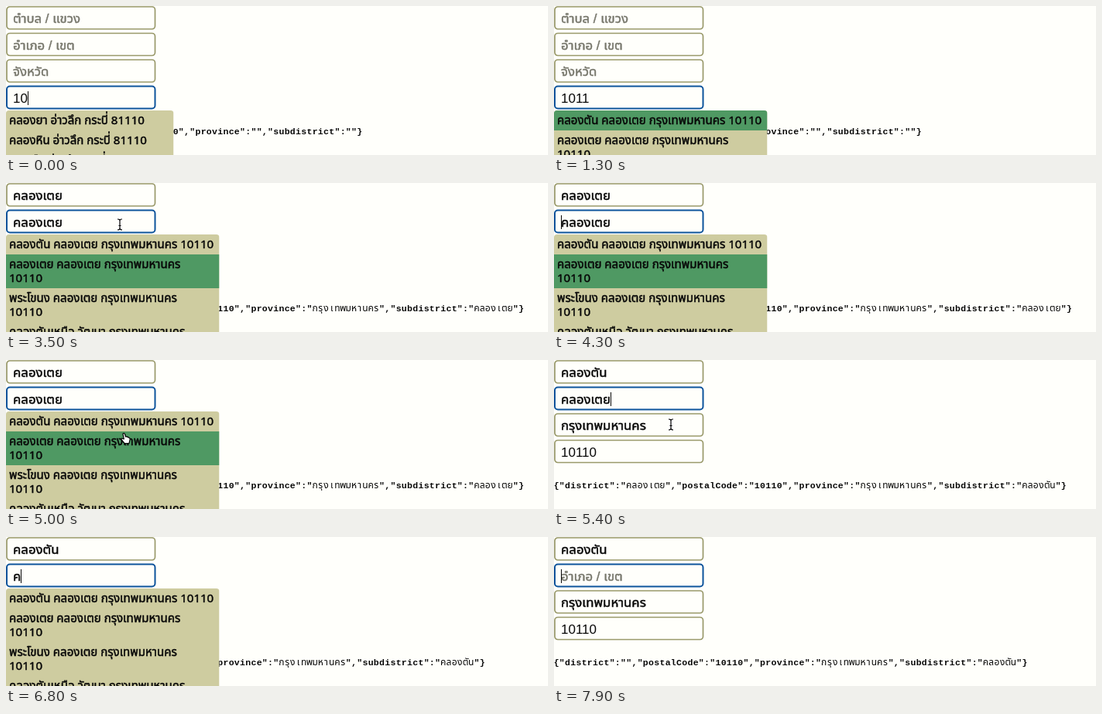
Animation, 700 px wide and 194 px high, one loop 8000 ms. Source, as an HTML page with a canvas:

```html
<!DOCTYPE html>
<html lang="th">
<head>
<meta charset="utf-8">
<title>Address autocomplete</title>
<style>
html, body { margin: 0; width: 100%; height: 100%; overflow: hidden; background: #fffffb; }
canvas { display: block; }
</style>
</head>
<body>
<canvas id="stage" width="700" height="194"></canvas>
<script>
const ctx = document.getElementById('stage').getContext('2d');
const LOOP = 8000;
const INK = '#080808', HINT = '#77776c', PAPER = '#fffffb';
const LIST = '#cecca0', ACTIVE = '#4f9963', EDGE = '#99996a', FOCUS = '#0d549c';
const THAI = '"Noto Sans Thai Looped", "Noto Sans Thai", "Noto Sans", sans-serif';
const SANS = '"Liberation Sans", ' + THAI;
const MENU = '"Noto Sans", ' + THAI;
const MONO = '"Liberation Mono", "Noto Sans Thai Looped", "Noto Sans Thai", monospace';
const CELL = 7.2;

// Thai fallback faces differ in width, so derive one type size per style
function fitSize(family, sample, width, guess) {
  ctx.font = `${guess}px ${family}`;
  const ratio = width / ctx.measureText(sample).width;
  return guess * Math.min(1.2, Math.max(0.8, ratio));
}
const inputSize = fitSize(SANS, 'คลองเตย', 64, 17);
const menuSize = fitSize(MENU, 'คลองตัน คลองเตย กรุงเทพมหานคร 10110', 264.5, 15);

const ROWS = [0, 34.5, 69, 103.5];
const HINTS = ['ตำบล / แขวง', 'อำเภอ / เขต', 'จังหวัด', 'รหัสไปรษณีย์'];
const KRABI = [
  ['คลองยา อ่าวลึก กระบี่ 81110'],
  ['คลองหิน อ่าวลึก กระบี่ 81110'],
  ['นาเหนือ อ่าวลึก กระบี่ 81110']
];
const BANGKOK = [
  ['คลองตัน คลองเตย กรุงเทพมหานคร 10110'],
  ['คลองเตย คลองเตย กรุงเทพมหานคร', '10110'],
  ['พระโขนง คลองเตย กรุงเทพมหานคร', '10110'],
  ['คลองตันเหนือ วัฒนา กรุงเทพมหานคร', '10110']
];

// Pointer path: time, x, y
const PATH = [
  [2750, 630, 150], [2980, 147, 54], [4100, 147, 54], [4600, 147, 54],
  [4900, 154, 102], [5100, 154, 102], [5220, 151, 84], [5400, 151, 84],
  [5750, 135, 52], [6400, 135, 52]
];

function state(t) {
  const s = { values: ['', '', '', '10'], focus: 3, menu: null, active: -1, blink: 0, home: false };
  if (t < 2000) {
    if (t >= 300) { s.values[3] = '101'; s.blink = 300; }
    if (t >= 700) { s.values[3] = '1011'; s.blink = 700; }
    s.menu = t < 700 ? KRABI : BANGKOK;
    s.active = t < 1300 ? -1 : t < 1600 ? 0 : 1;
    return s;
  }
  s.values = ['คลองเตย', 'คลองเตย', 'กรุงเทพมหานคร', '10110'];
  s.blink = 2000;
  if (t >= 2980) {
    s.focus = 1;
    s.blink = 2980;
    s.menu = BANGKOK;
    s.active = 1;
  }
  if (t >= 4100) { s.home = true; s.blink = 4100; }
  if (t >= 5200) s.active = 0;
  if (t >= 5300) {
    s.values[0] = 'คลองตัน';
    s.home = false;
    s.blink = 5300;
    if (t < 5800) s.menu = null;
    else s.blink = 5800;
  }
  if (t >= 6400) {
    const gone = Math.min(7, 1 + Math.floor((t - 6400) / 70));
    s.values[1] = s.values[1].slice(0, 7 - gone);
    s.blink = 6330 + gone * 70;
    s.active = -1;
    if (gone === 7) s.menu = null;
  }
  return s;
}

// A thin outline gives the medium weight of the Thai text
function label(text, x, y, size, family, color, weight = 0.5) {
  ctx.font = `${size}px ${family}`;
  ctx.fillStyle = ctx.strokeStyle = color;
  ctx.fillText(text, x, y);
  if (weight) {
    ctx.lineWidth = weight;
    ctx.lineJoin = 'round';
    ctx.strokeText(text, x, y);
  }
  return ctx.measureText(text).width;
}

function drawField(i, s, t) {
  const y = ROWS[i], value = s.values[i], on = s.focus === i;
  ctx.beginPath();
  ctx.roundRect(1, y + 1, 191.5, 29, 4);
  ctx.fillStyle = PAPER;
  ctx.fill();
  ctx.lineWidth = on ? 2 : 1.7;
  ctx.strokeStyle = on ? FOCUS : EDGE;
  ctx.stroke();
  const digits = /^\d+$/.test(value);
  const w = label(value || HINTS[i], 9, Math.round(y + 22), digits ? 17 : inputSize,
    SANS, value ? INK : HINT, digits ? 0 : 0.5);
  if (on && (t - s.blink) % 1000 < 500) {
    ctx.fillStyle = INK;
    ctx.fillRect(value && !s.home ? Math.round(9 + w) : 9, Math.round(y + 7), 1, 18);
  }
}

function drawJson([subdistrict, district, province, postalCode]) {
  const text = JSON.stringify({ district, postalCode, province, subdistrict });
  const mark = '[\\u0e31\\u0e34-\\u0e3a\\u0e47-\\u0e4e]';
  const cells = text.match(new RegExp(`.${mark}*`, 'g'));
  ctx.fillStyle = INK;
  ctx.textAlign = 'center';
  cells.forEach((c, i) => {
    ctx.font = c > '\u0e00' ? `12px ${MONO}` : `bold 11.5px ${MONO}`;
    ctx.fillText(c, (i + 0.5) * CELL - 0.5, 167);
  });
  ctx.textAlign = 'left';
}

function drawMenu(s) {
  const top = ROWS[s.focus] + 32.5;
  const width = s.menu === KRABI ? 216.5 : 275.5;
  ctx.save();
  ctx.beginPath();
  ctx.roundRect(0, top, width, 220, 4);
  ctx.clip();
  ctx.fillStyle = LIST;
  ctx.fillRect(0, top, width, 220);
  let y = top;
  s.menu.forEach((lines, i) => {
    const h = lines.length > 1 ? 44 : 26;
    if (i === s.active) {
      ctx.fillStyle = ACTIVE;
      ctx.fillRect(0, y, width, h);
    }
    lines.forEach((line, n) => label(line, 4, Math.round(y + 18 + n * 18), menuSize, MENU, INK));
    y += h;
  });
  ctx.restore();
}

function pointerAt(t) {
  const first = PATH[0], last = PATH[PATH.length - 1];
  if (t < first[0] || t >= last[0] || (t >= 4100 && t < 4600)) return null;
  const k = PATH.findIndex((p, i) => i && t < p[0]);
  const a = PATH[k - 1], b = PATH[k];
  const u = (t - a[0]) / (b[0] - a[0]), e = u * u * (3 - 2 * u);
  return [a[1] + (b[1] - a[1]) * e, a[2] + (b[2] - a[2]) * e];
}

function outlined(path) {
  ctx.lineJoin = 'round';
  ctx.lineWidth = 1.2;
  ctx.fillStyle = '#fff';
  ctx.strokeStyle = '#000';
  ctx.fill(path);
  ctx.stroke(path);
}

const BEAM = new Path2D('M-3 -7Q0 -7 0 -5Q0 -7 3 -7M0 -5V5M-3 7Q0 7 0 5Q0 7 3 7M-1.5 1.5H1.5');
const ARROW = new Path2D('M0 0V13L3 10.2L5 15L7 14L5 9.5H9Z');
const HAND = new Path2D('M-3 -6Q-1.5 -7.5 -.5 -5.5L.5 -2Q2 -3 3 -1.5Q4.5 -2 5 -.5Q6.5 -.5 6 2L5 6.5H-1L-5.5 1Q-5 -.5 -3 .5L-1.7 1Z');

function drawPointer(t, s) {
  const p = pointerAt(t);
  if (!p) return;
  const [x, y] = p;
  ctx.save();
  ctx.translate(x, y);
  const menuTop = s.menu ? ROWS[s.focus] + 32.5 : 999;
  if (x < 276 && y > menuTop) outlined(HAND);
  else if (x < 193 && ROWS.some(r => y > r && y < r + 31)) {
    ctx.strokeStyle = '#fff';
    ctx.lineWidth = 3;
    ctx.stroke(BEAM);
    ctx.strokeStyle = '#000';
    ctx.lineWidth = 1.2;
    ctx.stroke(BEAM);
  } else outlined(ARROW);
  ctx.restore();
}

function draw() {
  const t = performance.now() % LOOP;
  const s = state(t);
  ctx.fillStyle = PAPER;
  ctx.fillRect(0, 0, 700, 194);
  drawJson(s.values);
  ROWS.forEach((_, i) => drawField(i, s, t));
  if (s.menu) drawMenu(s);
  drawPointer(t, s);
  requestAnimationFrame(draw);
}
draw();
</script>
</body>
</html>
```
